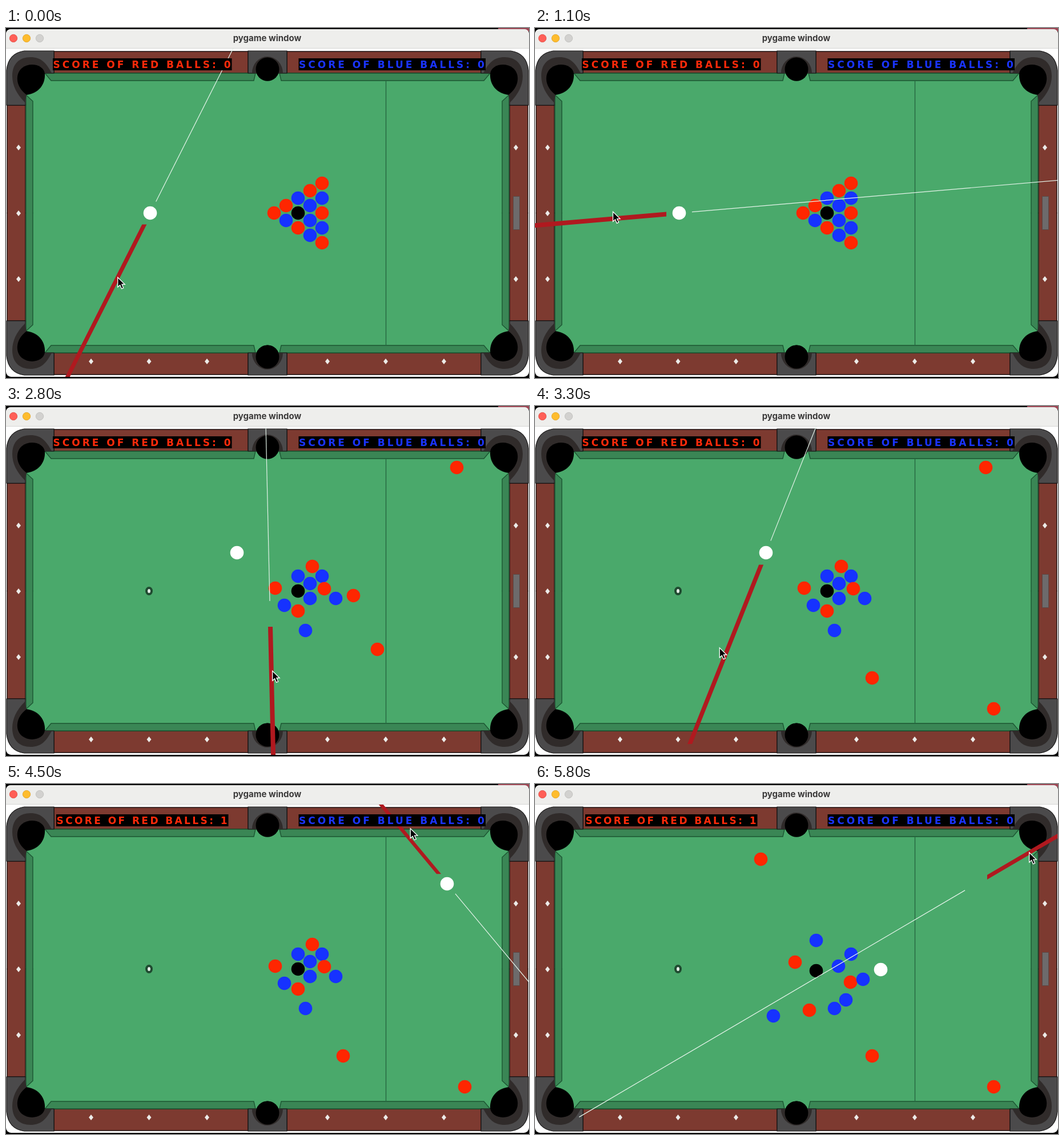
Write an HTML page that moves like this. It is 916 by 612 pixels and loops after 6000 ms.

```html
<!DOCTYPE html>
<html lang="en">
<head>
<meta charset="utf-8">
<title>Pool</title>
<style>
  html, body { margin: 0; width: 100%; height: 100%; overflow: hidden; background: #000; }
  svg { display: block; width: 916px; height: 612px; }
  .title { font: 700 15px Inter, sans-serif; fill: #3b3a3a; text-anchor: middle; }
  .score { font: 700 17px "DejaVu Sans", sans-serif; letter-spacing: 4px; }
  .rail { fill: #3a8655; stroke: #1c5632; stroke-width: 1.4; }
  .wood { fill: #7d3a30; stroke: #1a0d0b; stroke-width: 1.4; }
  .cap { fill: #4b4a4b; stroke: #161515; stroke-width: 1.2; }
  .ring { fill: #302b2a; }
  .gem { fill: #ecebe8; }
</style>
</head>
<body>
<svg viewBox="0 0 916 612">
  <defs>
    <clipPath id="view"><path d="M0 36H915V610H0Z"/></clipPath>
    <path id="gem" class="gem" d="M0 -5L4 0L0 5L-4 0Z"/>
    <g id="quarter">
      <path class="wood" d="M84 41H424V79H84Z"/>
      <path class="wood" d="M2 324V135H34V324"/>
      <path class="rail" d="M68 79H437L434 92H79Z"/>
      <path class="rail" d="M35 324V117L47 128V324"/>
      <path class="cap" d="M84 40H32Q4 44 1 74V135H34V117L68 79H84Z"/>
      <path class="ring" d="M11 84C11 62 24 51 43 51C61 51 70 60 80 79H68L36 117L33 130Q11 108 11 84Z"/>
      <path d="M36 117C16 102 16 80 28 70C42 59 66 64 68 80C69 98 58 114 36 117Z"/>
      <path class="cap" d="M458 40H424V79H458"/>
      <path class="ring" d="M431 79A27 29 0 0 1 485 79Z"/>
      <circle cx="458" cy="72" r="20.5"/>
    </g>
  </defs>

  <path d="M862 0H916V6H862Z" fill="#9c4654"/>
  <rect y="2" width="916" height="608" rx="9" fill="#fff"/>
  <path d="M0 36V11Q0 2 9 2H907Q916 2 916 11V36Z" fill="#eeeeec"/>
  <path d="M0 35.5H916" stroke="#d6d6d4"/>
  <g stroke-width=".8">
    <circle cx="13" cy="18" r="6.7" fill="#ff5f57" stroke="#dd4a42"/>
    <circle cx="36" cy="18" r="6.7" fill="#febc2e" stroke="#dda023"/>
    <circle cx="59" cy="18" r="6.7" fill="#d2d1cf" stroke="#bcbbb9"/>
  </g>
  <text class="title" x="457.500" y="23">pygame window</text>

  <path d="M35 79H881V568H35Z" fill="#4aa96b"/>
  <use href="#quarter"/>
  <use href="#quarter" transform="translate(916 0) scale(-1 1)"/>
  <use href="#quarter" transform="translate(0 647) scale(1 -1)"/>
  <use href="#quarter" transform="translate(916 647) scale(-1 -1)"/>
  <path d="M665.500 92V556" stroke="#266640" stroke-width="1.4"/>
  <g id="gems"></g>
  <path d="M888.500 294.500H899.500V352.500H888.500Z" fill="#6d6b6c" stroke="#5a4a48"/>
  <ellipse cx="250.500" cy="323.500" rx="4.500" ry="5.500" fill="#e4ece6" stroke="#1f4a30" stroke-width="4"/>

  <g id="balls" transform="translate(.5 .5)"></g>
  <g id="aim" clip-path="url(#view)">
    <path id="sight" stroke="#e4f3e9" stroke-width="1.2"/>
    <path id="cue" fill="#b0191f"/>
  </g>

  <rect id="redBox" y="53" height="21"/>
  <text id="redText" class="score" y="69.500" fill="#ff2a0a"></text>
  <rect x="512.500" y="53" width="327.500" height="21"/>
  <text class="score" x="513" y="69.500" fill="#1a34ff">SCORE OF BLUE BALLS: 0</text>

  <path id="mouse" d="M0 0V17L4 13.500L6.800 20L10 18.600L7.200 12.300H12.500Z" stroke="#fff" stroke-width="1.300"/>
</svg>
<script>
const LOOP = 6000, STEP = 100;
const $ = id => document.getElementById(id);
const clamp = v => Math.min(1, Math.max(0, v));
const mix = (a, b, f) => a + (b - a) * f;
const mix2 = (p, q, f) => [mix(p[0], q[0], f), mix(p[1], q[1], f)];
const easeIn = p => u => u ** p;
const easeOut = p => u => 1 - (1 - u) ** p;
const friction = easeOut(2);

function add(parent, tag, attrs) {
  const el = document.createElementNS('http://www.w3.org/2000/svg', tag);
  set(el, attrs);
  return parent.appendChild(el);
}
function set(el, attrs) {
  for (const k in attrs) el.setAttribute(k, attrs[k]);
}

// Diamonds: three per side, the right middle one is covered by the slot
const gem = (x, y) => add($('gems'), 'use', { href: '#gem', x, y });
for (let i = 0; i < 3; i++) {
  gem(22, 209 + 115 * i);
  if (i !== 1) gem(893, 209 + 115 * i);
  gem(149 + 101.5 * i, 583);
  gem(563 + 102 * i, 583);
}

// Rack: five columns of one to five balls, then the cue ball
const paint = { R: '#ff2600', B: '#1632ff', K: '#000', W: '#fff' };
const colors = [...'RRBBKRRBBBRBRBRW'];
const start = [];
for (let col = 0; col < 5; col++)
  for (let row = 0; row <= col; row++)
    start.push([469 + 21 * col, 323 + 26 * (row - col / 2)]);
const WHITE = start.length, POCKETED = 10, POCKET_TIME = 4000;

// Where the cue ball rests before each shot
const rests = [[252, 323], [462, 363], [404, 256], [772, 174]];
start.push(rests[0]);

// Each roll sends some balls to new places
const rolls = [
  { at: 1200, span: 200, to: { [WHITE]: [446, 326] } },
  { at: 1400, span: 400, to: {
    0: [483, 318], 1: [469, 270], 2: [487, 348], 5: [511, 358], 6: [536, 280],
    9: [524, 392], 10: [789, 107], 12: [557, 319], 13: [577, 336], 14: [650, 425], [WHITE]: rests[1] } },
  { at: 2600, span: 100, to: { [WHITE]: [461, 331] } },
  { at: 2700, span: 100, to: { 0: [471, 318], 1: [608, 331], [WHITE]: rests[2] } },
  { at: 2800, span: 100, to: { 1: [628, 415] } },
  { at: 2900, span: 300, to: { 1: [590, 475], 14: [803, 529] } },
  { at: 3800, span: 200, to: { [WHITE]: [769, 132] } },
  { at: 4000, span: 300, to: { [WHITE]: rests[3] } },
  { at: 5500, span: 100, to: { [WHITE]: [620, 263] } },
  { at: 5600, span: 200, to: {
    0: [455, 311], 2: [417, 405], 3: [492, 273], 4: [492, 326], 5: [480, 395], 6: [395, 131],
    7: [531, 318], 8: [544, 377], 12: [552, 346], 13: [574, 341], [WHITE]: [605, 324] } }];

const place = (i, t) => rolls.reduce((p, { at, span, to }) =>
  to[i] ? mix2(p, to[i], friction(clamp((t - at) / span))) : p, start[i]);

// The mouse circles the resting cue ball: degrees and distance, first and last
const aims = [
  { from: 0, to: 1100, hide: 1300, deg: [116.8, 181.1], dist: [126, 116], ease: easeIn(2.66) },
  { from: 1800, to: 2600, hide: 2800, deg: [136.5, 88.7], dist: [140, 100], ease: easeOut(4) },
  { from: 2900, to: 3700, hide: 3800, deg: [73, 159.1], dist: [216, 154], ease: easeIn(1) },
  { from: 4300, to: 5400, hide: LOOP, deg: [203.7, 329.6], dist: [119, 108], ease: easeOut(1.5) }];
aims.forEach((a, i) => a.hub = rests[i].map(v => v + .5));
const LAG = 40, TRAVEL = 300;

const polar = ([x, y], deg, d) =>
  [x + d * Math.cos(deg * Math.PI / 180), y + d * Math.sin(deg * Math.PI / 180)];

function orbit(aim, t) {
  const e = aim.ease(clamp((t - aim.from) / (aim.to - aim.from)));
  const deg = mix(...aim.deg, e);
  return { deg, point: polar(aim.hub, deg, mix(...aim.dist, e)) };
}

function drawMouse(t) {
  const next = aims.findIndex(a => a.from > t);
  const now = aims.at(next < 0 ? -1 : next - 1);
  let p = orbit(now, t).point;
  if (next > 0) {
    const aim = aims[next];
    p = mix2(p, orbit(aim, aim.from).point, clamp((t - aim.from) / TRAVEL + 1));
  }
  set($('mouse'), { transform: `translate(${p})` });
}

function drawAim(t) {
  const aim = aims.find(a => t >= a.from && t <= a.hide);
  $('aim').style.display = aim ? '' : 'none';
  if (!aim) return;
  const { deg } = orbit(aim, t - LAG);
  const at = d => polar(aim.hub, deg, d);
  const [x1, y1] = at(22.5), [x2, y2] = at(360);
  // Ends are cut along the minor axis
  const flat = Math.abs(x2 - x1) > Math.abs(y2 - y1), ox = flat ? 0 : 4, oy = 4 - ox;
  set($('cue'), { d: `M${x1 - ox} ${y1 - oy}L${x1 + ox} ${y1 + oy}L${x2 + ox} ${y2 + oy}L${x2 - ox} ${y2 - oy}Z` });
  set($('sight'), { d: `M${at(-22.5)}L${at(-806)}` });
}

function drawScore(score) {
  const inset = score ? 6 : 0;
  set($('redBox'), { x: 82 + inset, width: 313.5 - 2 * inset });
  set($('redText'), { x: 82.5 + inset });
  $('redText').style.letterSpacing = score ? '3.4px' : '';
  $('redText').textContent = `SCORE OF RED BALLS: ${score}`;
}

const balls = colors.map(c => add($('balls'), 'circle', { r: 11.8, fill: paint[c] }));

function draw(t) {
  balls.forEach((ball, i) => {
    const [cx, cy] = place(i, t);
    set(ball, { cx, cy });
  });
  const won = t >= POCKET_TIME;
  balls[POCKETED].style.display = won ? 'none' : '';
  drawScore(won ? 1 : 0);
  drawAim(t);
  drawMouse(t);
}

let shown = -1;
function tick() {
  const t = Math.floor(performance.now() % LOOP / STEP) * STEP;
  if (t !== shown) draw(shown = t);
  requestAnimationFrame(tick);
}
tick();
</script>
</body>
</html>
```
